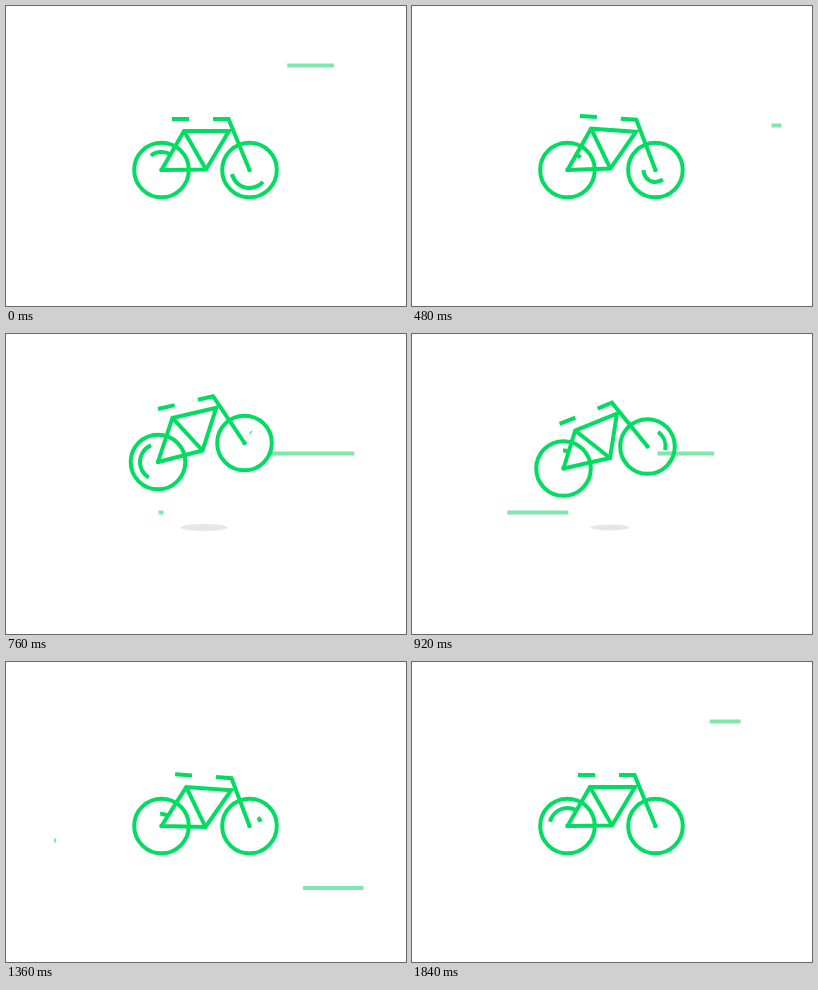
An HTML page with a canvas for the animation above (1.88 s loop, 400x300 px).

```html
<!DOCTYPE html>
<html>
<head>
<meta charset="utf-8">
<style>
html, body { margin: 0; width: 100%; height: 100%; overflow: hidden; background: #fff; }
canvas { display: block; }
</style>
</head>
<body>
<canvas id="stage" width="400" height="300"></canvas>
<script>
const LOOP = 1880, GREEN = '#00dd60', PALE = '#7de8aa', GROUND = 164;
const ctx = document.getElementById('stage').getContext('2d');

// time, crank x, crank y, tilt in degrees, rear hub x, y, front hub x, y
const POSES = [
  [0, 200, 163.5, 0, 155.5, 164, 243.5, 164],
  [160, 199.8, 167.5, .3, 155.5, 164, 243.5, 164],
  [300, 199.5, 172, .5, 155.5, 164, 243.5, 164],
  [420, 199, 170, 2, 155.5, 164, 243.5, 164],
  [520, 198, 156, 5, 155.3, 164, 243.3, 164],
  [600, 197.5, 140.5, 5, 154.5, 151.5, 242.5, 149.5],
  [760, 196.5, 116.5, -13, 152, 128, 238.5, 109],
  [920, 198, 124, -22, 151.5, 134.5, 235.5, 112.5],
  [1120, 196.5, 165.5, -6, 153.5, 163.5, 240, 150.5],
  [1200, 198.5, 171, 0, 155, 164, 243, 164],
  [1360, 199.5, 165, 4, 155.5, 164, 243.5, 164],
  [1480, 200, 162, 1, 155.5, 164, 243.5, 164],
  [1620, 200, 163.5, 0, 155.5, 164, 243.5, 164],
  [1880, 200, 163.5, 0, 155.5, 164, 243.5, 164]
];

// y, start x, length, start time, delay of the trailing end
const STREAKS = [
  [59.5, 328.5, 124, 1768, 77],
  [119.5, 369.5, 124, 457, 98],
  [178.5, 157.5, 109.5, 747, 123],
  [226, 358.5, 124, 1211, 104]
];

// radius, start time
const REAR_SPINS = [[18, 430], [12, 900], [18, 1456], [18, 1456 - LOOP]];
const FRONT_SPINS = [[18, -235], [12, 235], [18, 800], [12, 1294]];

const clamp = v => Math.max(0, Math.min(1, v));
const smooth = v => (v = clamp(v), v * v * (3 - 2 * v));
const rad = deg => deg * Math.PI / 180;

// Smooth curve through the poses
function poseAt(t) {
  let i = 0;
  while (i < POSES.length - 2 && t >= POSES[i + 1][0]) i++;
  const a = POSES[i], b = POSES[i + 1];
  const before = POSES[Math.max(0, i - 1)], after = POSES[Math.min(POSES.length - 1, i + 2)];
  const span = b[0] - a[0], p = (t - a[0]) / span, q = 1 - p;
  return a.slice(1).map((v, k) => {
    const c = k + 1;
    const m = (b[c] - before[c]) / (b[0] - before[0]) * span;
    const n = (after[c] - a[c]) / (after[0] - a[0]) * span;
    return v * (1 + 2 * p) * q * q + m * p * q * q + b[c] * p * p * (3 - 2 * p) - n * p * p * q;
  });
}

function line(...points) {
  ctx.beginPath();
  points.forEach(([x, y]) => ctx.lineTo(x, y));
  ctx.stroke();
}

function arc([x, y], r, from = 0, to = 360) {
  ctx.beginPath();
  ctx.arc(x, y, r, rad(from), rad(to));
  ctx.stroke();
}

function streak(t, [y, x, length, start, delay]) {
  const age = (t - start + LOOP) % LOOP;
  const head = length * Math.sin(clamp(age / 450) * Math.PI / 2);
  const tail = length * clamp((age - delay) / 495) ** 2;
  if (head > tail) line([x - tail, y], [x - head, y]);
}

function wheel(t, hub, spins, base) {
  arc(hub, 27.3);
  for (const [r, start] of spins) {
    const head = 360 * smooth((t - start) / 420);
    const tail = 360 * smooth((t - start - 85) / 470);
    if (head > tail) arc(hub, r, base + tail, base + head);
  }
  ctx.beginPath();
  ctx.arc(...hub, 2.3, 0, 7);
  ctx.fill();
}

function shadow(t) {
  const size = Math.min(smooth((t - 550) / 190), smooth((1110 - t) / 260));
  if (!size) return;
  ctx.fillStyle = '#e6e6e6';
  ctx.beginPath();
  ctx.ellipse(198, 193.5, 23.7 * size, 3.5 * size, 0, 0, 7);
  ctx.fill();
}

function bike(t) {
  const [x, y, deg, rx, ry, fx, fy] = poseAt(t);
  const rear = [rx, Math.min(ry, GROUND)], front = [fx, Math.min(fy, GROUND)];
  const tilt = Math.atan2(front[1] - rear[1], front[0] - rear[0]) * 180 / Math.PI;
  const c = Math.cos(rad(deg)), s = Math.sin(rad(deg));
  const at = (u, v) => [x + u * c - v * s, y + u * s + v * c];
  const crank = at(0, 0), seat = at(-22, -38.5), neck = at(23, -38.5);

  ctx.strokeStyle = ctx.fillStyle = GREEN;
  wheel(t, rear, REAR_SPINS, tilt - 58);
  wheel(t, front, FRONT_SPINS, tilt - 45);
  if (t > 220 && t < 340) arc(rear, 5, 20, 80);
  line(rear, seat, neck, crank, rear);
  line(seat, crank);
  line(at(-34, -50.5), at(-17, -50.5));
  line(at(7, -50.5), at(22.5, -50.5), front);
}

function draw(now) {
  const t = Math.floor(now % LOOP / 40) * 40;
  ctx.clearRect(0, 0, 400, 300);
  ctx.lineWidth = 4;
  shadow(t);
  ctx.strokeStyle = PALE;
  STREAKS.forEach(s => streak(t, s));
  bike(t);
}

const begin = performance.now();
function tick() {
  draw(performance.now() - begin);
  requestAnimationFrame(tick);
}
tick();
</script>
</body>
</html>
```
